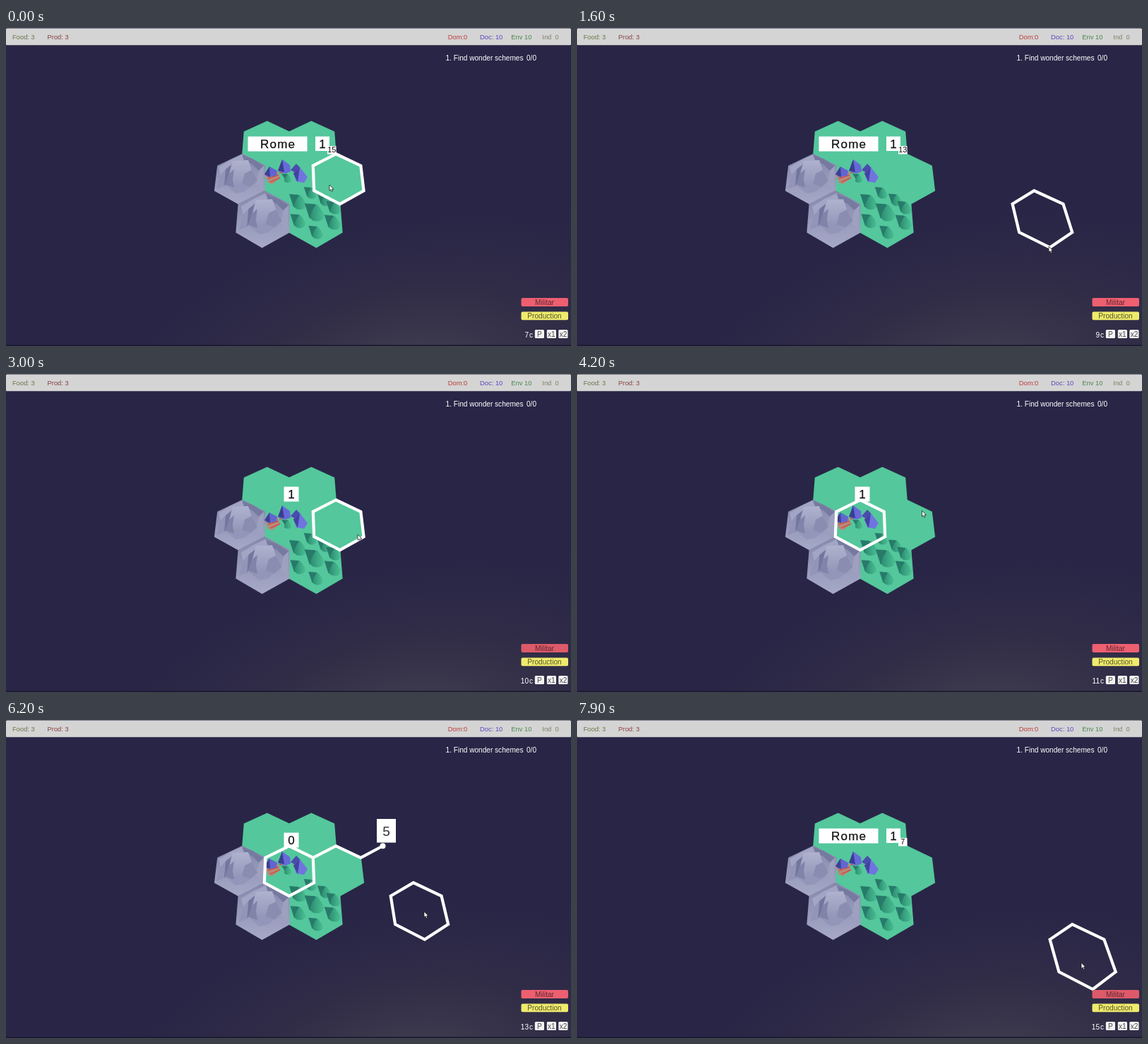
Recreate the animation shown at these times as an HTML page. Size 800 by 450 pixels, loop 8 s.

```html
<!DOCTYPE html>
<html lang="en">
<head>
<meta charset="utf-8">
<title>Hex island</title>
<style>
html, body { margin: 0; width: 100%; height: 100%; overflow: hidden; background: #292546; }
svg { display: block; width: 800px; height: 450px; font: 9.4px "Liberation Sans", Arial, sans-serif; cursor: none; }
.mid { text-anchor: middle; }
.ui { font-size: 10.1px; }
.big { font-size: 17px; fill: #111; stroke: #111; stroke-width: .25; }
.line { fill: none; stroke: #fff; stroke-width: 4.2; stroke-linejoin: miter; }
</style>
</head>
<body>
<svg viewBox="0 0 800 450" xml:space="preserve">
  <defs>
    <radialGradient id="glow" gradientUnits="userSpaceOnUse" cx="0" cy="0" r="1" gradientTransform="translate(570 490) rotate(-10) scale(460 240)">
      <stop offset="0" stop-color="#484552" stop-opacity=".9"/>
      <stop offset=".5" stop-color="#3a3649" stop-opacity=".45"/>
      <stop offset="1" stop-color="#2d2948" stop-opacity="0"/>
    </radialGradient>
    <linearGradient id="leaf">
      <stop offset="0" stop-color="#2c8c70"/>
      <stop offset=".55" stop-color="#3daa85"/>
      <stop offset="1" stop-color="#4abd93"/>
    </linearGradient>
    <linearGradient id="rock" x2="0" y2="1">
      <stop offset="0" stop-color="#8588ab"/>
      <stop offset="1" stop-color="#a6a9c7"/>
    </linearGradient>
    <linearGradient id="dome" x2="0" y2="1">
      <stop offset="0" stop-color="#b0b3cf"/>
      <stop offset="1" stop-color="#9093b5"/>
    </linearGradient>
    <g id="tree">
      <path d="M-15-12L-2-11L6 0L-1 9L-9 6Z" fill="#277a69"/>
      <path d="M0-11Q5-6 9 2Q9 10 0 10Q-8 10-8 3Q-5-6 0-11Z" fill="url(#leaf)"/>
    </g>
    <g id="mountain">
      <path d="M-30-15L-14-25L3-33L18-27L5-25L-10-20L-20-12L-27-4Z" fill="#a2a5c4"/>
      <path d="M3-33L18-27L34-17L27-10L18-19L6-25Z" fill="#777aa0"/>
      <path d="M-27-4L-20-12L-17 3L-22 12L-33 16Z" fill="#9295b7"/>
      <path d="M34-17L33 16L23 9L27-10Z" fill="#9da0bf"/>
      <path d="M-20-12L-10-20L-16 2L-22 12Z" fill="#73769e"/>
      <path d="M-10-24L12-25L17-11L25 4L15 13L3 9L-8 14L-20 10L-15-6Z" fill="url(#dome)"/>
      <path d="M-15-6L-8-12L-10 2L-8 14L-20 10Z" fill="#8184a8"/>
      <path d="M3 9L7-6L17-11L25 4L15 13Z" fill="#8a8db0"/>
      <path d="M-20 10L-8 14L3 9L15 13L6 20L-6 22Z" fill="#9396b8"/>
    </g>
  </defs>

  <rect width="800" height="450" fill="#292546"/>
  <rect width="800" height="450" fill="url(#glow)"/>
  <rect y="448.5" width="800" height="1.5" fill="#191730"/>

  <g id="land" fill="#54c79c"></g>
  <use href="#mountain" x="331" y="212"/>
  <use href="#mountain" transform="translate(364.4 268.6) scale(1.05)"/>
  <g id="forest"></g>

  <g id="village">
    <path d="M366 207L372 198L385 203L388 212L377 221L371 219Z" fill="#b58a7c"/>
    <path d="M371 213L386 208M374 218L388 212M387 205L402 203M407 205L414 210" stroke="#d4503f" stroke-width="1.4"/>
    <path d="M366 207L373 196L384 202L383 209L371 211Z" fill="#6265cf"/>
    <path d="M366 207L373 196L374 211Z" fill="#3d3f94"/>
    <path d="M386 203L391 186L402 194L403 203L396 206Z" fill="#666ad8"/>
    <path d="M385 202L391 186L394 204Z" fill="#3a3c92"/>
    <path d="M403 201L411 192L417 198L410 205Z" fill="#4a4cad"/>
    <path d="M407 206L416 197L427 211L422 219L411 217Z" fill="#7074df"/>
    <path d="M407 206L416 197L413 218Z" fill="#4143a0"/>
    <path d="M390 206L400 207L397 217Z" fill="#287a68"/>
    <path d="M399 207Q405 213 404 217Q399 221 394 217Q394 211 399 207Z" fill="url(#leaf)"/>
  </g>

  <path id="hover" class="line"/>
  <path id="picked" class="line"/>
  <g id="route">
    <path id="road" class="line"/>
    <circle id="goal" r="4" fill="#fff"/>
    <rect x="525" y="140" width="27" height="33.5" fill="#fff"/>
    <text class="mid" x="538.5" y="164" font-size="19" fill="#333">5</text>
  </g>

  <g id="city">
    <rect x="342.5" y="153.5" width="84" height="21" fill="#fff"/>
    <text class="big" x="360" y="170" letter-spacing="1.2">Rome</text>
    <rect x="438" y="153.5" width="20" height="20.5" fill="#fff"/>
    <text class="big mid" x="448" y="170">1</text>
    <rect x="455" y="167" width="12.5" height="11.5" fill="#fff"/>
    <text id="left" class="mid" x="461.3" y="176.3" font-size="10.8" fill="#111"></text>
  </g>
  <g id="army">
    <rect x="393.5" y="159.5" width="21" height="21" fill="#fff"/>
    <text id="units" class="big mid" x="404" y="175.5"></text>
  </g>

  <rect y=".4" width="800" height="23.8" rx="1.5" fill="#d4d4d4"/>
  <text x="9" y="15.5" fill="#6a784c">Food: 3</text>
  <text x="58.5" y="15.5" fill="#8a4242">Prod: 3</text>
  <text x="625.7" y="15.5" fill="#bd3c3c">Dom:0</text>
  <text x="671" y="15.5" fill="#5a4abc">Doc: 10</text>
  <text x="715.3" y="15.5" fill="#4a8850">Env 10</text>
  <g fill="#7f8068"><text x="759.3" y="15.5">Ind</text><text x="777.5" y="15.5">0</text></g>

  <g class="ui" fill="#fff">
    <text x="622.5" y="46">1. Find wonder schemes</text><text x="737" y="46">0/0</text>
    <text id="clock" x="740" y="437.5" text-anchor="end"></text><text x="741" y="437.5">c</text>
  </g>
  <g class="ui mid">
    <rect id="militar" x="729.5" y="382" width="66.5" height="12" rx="2"/>
    <text x="762.5" y="391.7" fill="#5c2730">Militar</text>
    <rect x="729.5" y="401.5" width="66.5" height="11.7" rx="2" fill="#efeb6c"/>
    <text x="762.5" y="411" fill="#57552c">Production</text>
    <g fill="#f3f3f3">
      <rect x="748.8" y="427" width="13.2" height="12" rx="1.5"/>
      <rect x="765.8" y="427" width="13.2" height="12" rx="1.5"/>
      <rect x="782.3" y="427" width="13.2" height="12" rx="1.5"/>
    </g>
    <g fill="#4a4a4a"><text x="755.4" y="436.7">P</text><text x="772.4" y="436.7">x1</text><text x="789" y="436.7">x2</text></g>
  </g>

  <path id="mouse" d="M0 0V8.2L1.9 6.5L3.1 9.4L4.6 8.8L3.4 6H5.9Z" fill="#fff" stroke="#111" stroke-width=".7"/>
</svg>
<script>
const $ = id => document.getElementById(id);
const LOOP = 8000, W = Math.sqrt(3);

// Perspective of the board: flat hex coordinates to the screen and back.
const X0 = 401, Y0 = 212.2, SX = 39.8, SY = 26.7, TILT = 0.0407;
const project = (u, v) => {
  const depth = 1 - TILT * v;
  return [X0 + SX * u / depth, (Y0 + SY * v) / depth];
};
const unproject = (x, y) => {
  const v = (y - Y0) / (SY + TILT * y);
  return [(x - X0) * (1 - TILT * v) / SX, v];
};
const pathOf = points => "M" + points.map(p => project(...p).map(n => n.toFixed(2))).join("L");
const hexPath = (u, v, size = 1) => pathOf([0, 1, 2, 3, 4, 5].map(i => {
  const a = i * Math.PI / 3;
  return [u + size * Math.sin(a), v - size * Math.cos(a)];
})) + "Z";

function cellAt(x, y) {
  const [u, v] = unproject(x, y);
  let best, min = Infinity;
  for (let row = Math.floor(v / 1.5); row <= Math.floor(v / 1.5) + 1; row++) {
    const shift = row & 1 ? 0.5 : 0;
    const cell = [(Math.round(u / W - shift) + shift) * W, row * 1.5];
    const d = Math.hypot(u - cell[0], v - cell[1]);
    if (d < min) { min = d; best = cell; }
  }
  return best;
}

const grass = [[-.5, -1], [.5, -1], [0, 0], [1, 0], [.5, 1]];
const rocks = [[-1, 0], [-.5, 1]];
const tiles = (cells, fill) =>
  cells.map(([c, r]) => `<path d="${hexPath(c * W, r * 1.5, 1.015)}" fill="${fill}"/>`).join("");
$("land").innerHTML = tiles(grass, "#54c79c") + tiles(rocks, "url(#rock)");

const trees = [[433, 234, .75], [453, 244, .8], [416, 247, 1], [466, 255, .85],
  [440, 262, 1.15], [416, 274, .9], [465, 276, .95], [441, 290, .85]];
$("forest").innerHTML = trees.map(([x, y, s]) =>
  `<use href="#tree" transform="translate(${x} ${y}) scale(${s})"/>`).join("");

const road = [[W / 2, -.5], [W, -1], [W * 1.5, -.5], [W * 2, -1]];
$("road").setAttribute("d", pathOf(road));
const [goalX, goalY] = project(...road[3]);
$("goal").setAttribute("cx", goalX);
$("goal").setAttribute("cy", goalY);
$("picked").setAttribute("d", hexPath(0, 0));

// Pointer stops: time, x, y
const stops = [[0, 458, 222], [800, 411, 216], [1600, 668, 309], [2200, 752, 387], [2500, 752, 387],
  [3000, 498, 227], [3600, 405, 215], [3900, 405, 215], [4200, 488.5, 193.5], [4900, 533, 178],
  [5200, 533, 178], [6200, 592, 271], [6800, 752, 387], [7300, 752, 387], [7900, 714, 343.5]];
const ARMY_ON = 2300, PICK = 3800, SEND = 5000, ARMY_OFF = 7000;

function pointer(t) {
  const i = stops.findIndex((s, k) => k && t <= s[0]);
  const [t0, x0, y0] = stops[i - 1], [t1, x1, y1] = stops[i];
  const p = (t - t0) / (t1 - t0), e = p * p * (3 - 2 * p);
  return [x0 + (x1 - x0) * e, y0 + (y1 - y0) * e];
}

const show = (id, on) => $(id).style.display = on ? "" : "none";

function draw(t) {
  const [x, y] = pointer(t);
  const army = t >= ARMY_ON && t < ARMY_OFF;
  const clock = Math.floor(7.6 + t / 1000);
  $("mouse").setAttribute("transform", `translate(${x} ${y})`);
  $("hover").setAttribute("d", hexPath(...cellAt(x, y)));
  show("hover", y < 380 && !(t >= PICK && t < SEND));
  show("picked", t >= PICK && t < ARMY_OFF);
  show("route", t >= SEND && t < ARMY_OFF);
  show("city", !army);
  show("army", army);
  $("clock").textContent = clock;
  $("left").textContent = 22 - clock;
  $("units").textContent = t < SEND ? 1 : 0;
  const pressed = t >= ARMY_ON && t < PICK || t >= ARMY_OFF;
  $("militar").setAttribute("fill", pressed ? "#dc5a69" : "#ee5f70");
}

function tick(now) {
  draw(Math.floor(now % LOOP / 100) * 100);
  requestAnimationFrame(tick);
}
draw(0);
requestAnimationFrame(tick);
</script>
</body>
</html>
```
